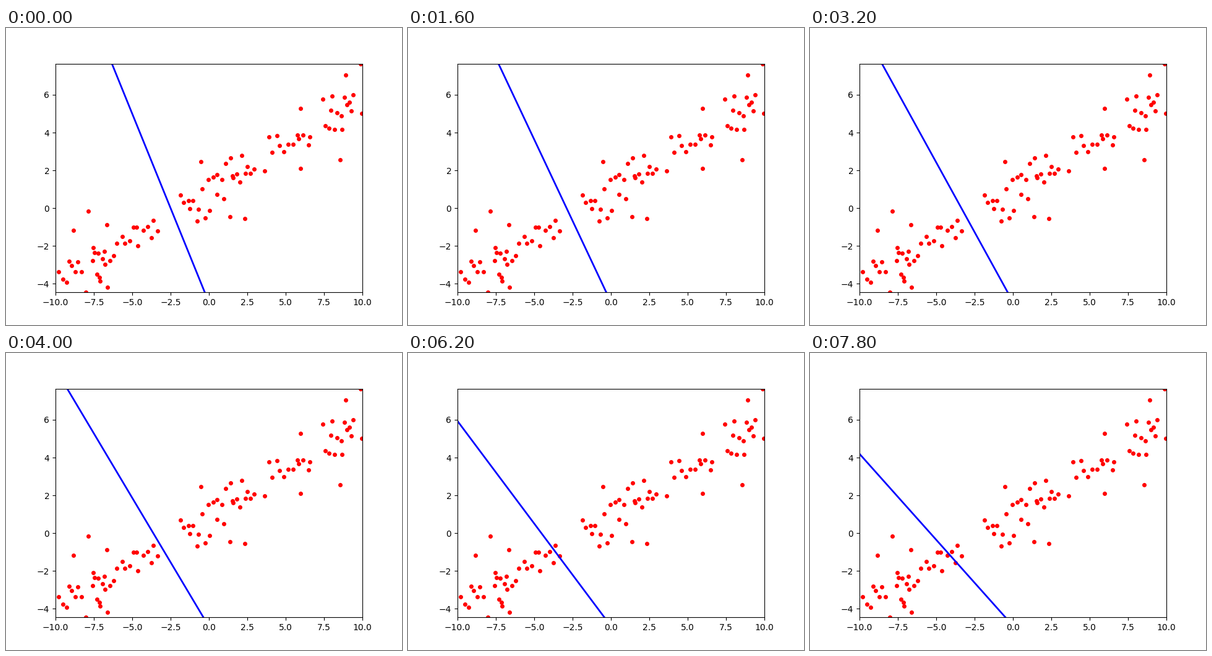
Recreate the animation shown at these times as a matplotlib script. Size 640 by 480 pixels, loop 8 s.

```python
import numpy as np
import matplotlib.pyplot as plt
from matplotlib.animation import FuncAnimation

STEPS, INTERVAL = 40, 200
X_LIM, Y_LIM = (-10, 10), (-4.455, 7.65)
SLOPE, OFFSET = 0.5, 1      # the trend the line moves towards
NOISE = 0.65

# runs of points along x: first, last, count
RUNS = [(-9.5, -8.3, 7), (-7.64, -6.63, 11), (-6.35, -3.3, 14),
        (-1.8, -0.06, 10), (0.1, 2.84, 17), (3.65, 6.7, 13), (7.44, 9.45, 14)]

# points on the rim and far from the trend
OUTLIERS = [(-9.8, -3.37), (-8.83, -1.17), (-8.02, -4.45), (-7.86, -0.16),
            (-6.61, -4.19), (-0.52, 2.46), (1.37, -0.46), (2.34, -0.56),
            (5.97, 5.28), (5.97, 2.1), (8.55, 2.56), (8.91, 7.05),
            (9.88, 7.65), (9.96, 5.02)]


def scatter_points():
    rng = np.random.default_rng(7)
    x = np.concatenate([np.linspace(*run) for run in RUNS])
    x += rng.normal(0, 0.06, x.size)
    y = SLOPE * x + OFFSET + rng.normal(0, NOISE, x.size)
    far_x, far_y = np.transpose(OUTLIERS)
    return np.append(x, far_x), np.append(np.clip(y, *Y_LIM), far_y)


def decay(start, goal, rate, n):
    """Value after n descent steps that shrink the error by rate."""
    return goal + (start - goal) * rate ** n


fig, ax = plt.subplots(figsize=(6.4, 4.8), dpi=100)
ax.set(xlim=X_LIM, ylim=Y_LIM)
ax.plot(*scatter_points(), "ro", markersize=4)
ends = np.array(X_LIM)
line, = ax.plot([], [], "b-", linewidth=2)


def update(n):
    slope = decay(-2, SLOPE, 0.98542, n)
    offset = decay(-5, OFFSET, 0.99957, n)
    line.set_data(ends, slope * ends + offset)
    return line,


anim = FuncAnimation(fig, update, frames=STEPS, interval=INTERVAL,
                     init_func=lambda: update(0), repeat=True, repeat_delay=0)
plt.show()
```
